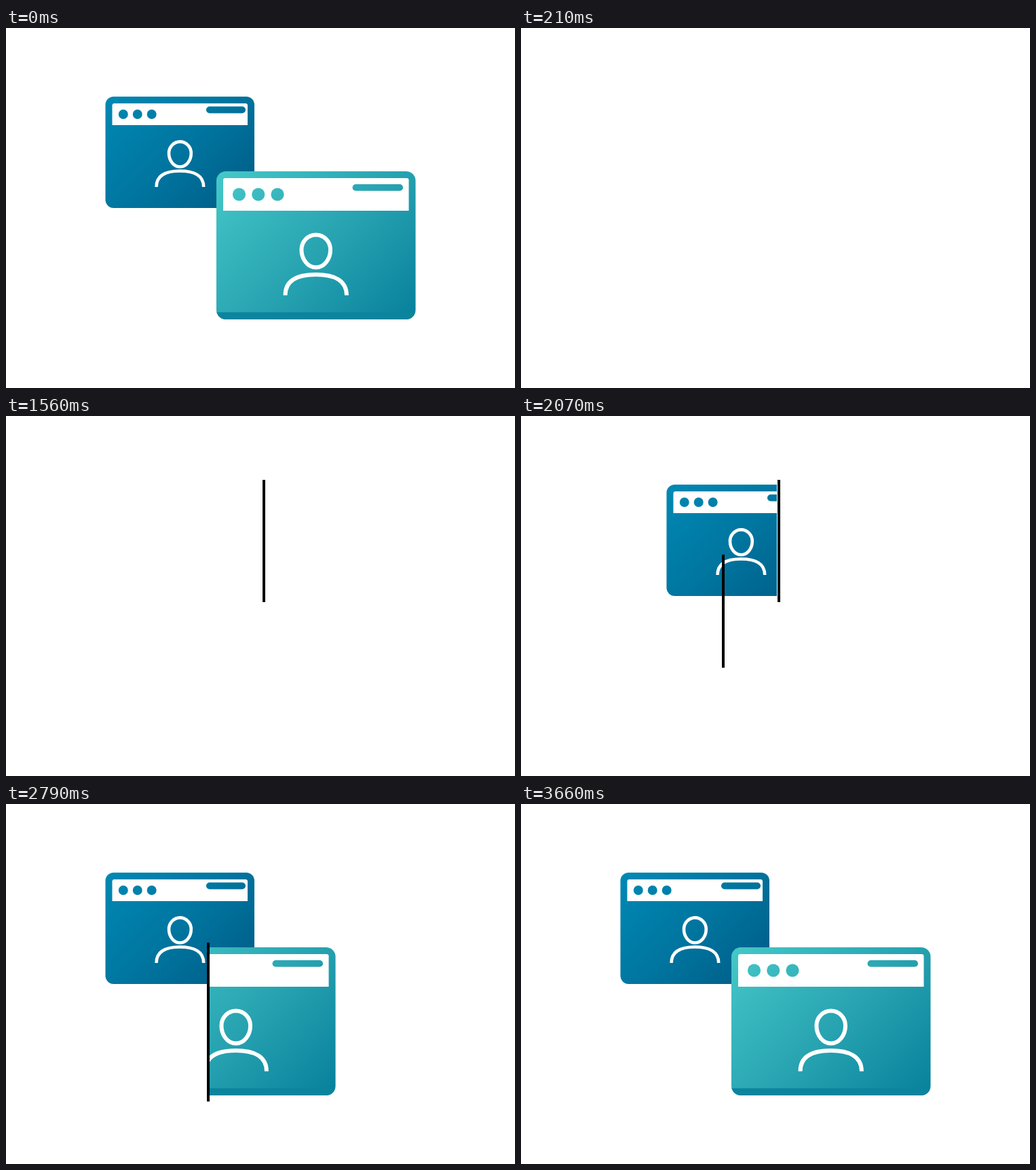
Animation of 750 by 530 pixels, one loop 3.9 s. Source, as an HTML page:

```html
<!DOCTYPE html>
<html lang="en">
<head>
<meta charset="utf-8">
<title>Two windows</title>
<style>
  html, body { margin: 0; height: 100%; overflow: hidden; background: #fff; }
  svg { display: block; }
</style>
</head>
<body>
<svg id="stage" width="750" height="530" viewBox="0 0 750 530"></svg>
<script>
const LOOP = 3900, TICK = 30;
const stage = document.getElementById('stage');

function windowMarkup(w) {
  const reach = (w.width + w.height) / 2;
  const fill = `url(#${w.id}-fill)`;
  const dots = [0, 1, 2].map(i =>
    `<circle cx="${w.dotX + i * w.dotGap}" cy="${w.dotY}" r="${w.dotR}" fill="${fill}"/>`).join('');
  const [barX, barY, barW, barH] = w.bar;
  const [clipX, clipW] = w.clip;
  return `
    <linearGradient id="${w.id}-fill" gradientUnits="userSpaceOnUse"
      x1="${w.x}" y1="${w.y}" x2="${w.x + reach}" y2="${w.y + reach}">
      <stop stop-color="${w.colors[0]}"/>
      <stop offset=".5" stop-color="${w.colors[1]}"/>
      <stop offset="1" stop-color="${w.colors[2]}"/>
    </linearGradient>
    <clipPath id="${w.id}-clip"><rect x="${clipX}" width="${clipW}" height="530"/></clipPath>
    <clipPath id="${w.id}-shape">
      <rect x="${w.x}" y="${w.y}" width="${w.width}" height="${w.height}" rx="${w.radius}"/>
    </clipPath>
    <g clip-path="url(#${w.id}-clip)"><g id="${w.id}">
      <rect x="${w.x}" y="${w.y}" width="${w.width}" height="${w.height}" rx="${w.radius}" fill="${fill}"/>
      ${w.base ? `<rect x="${w.x}" y="${w.y + w.height - 10.5}" width="${w.width}" height="10.5"
        fill="${w.base}" clip-path="url(#${w.id}-shape)"/>` : ''}
      <path d="M${w.x + 10} ${w.y + 10 + w.header}v${3 - w.header}q0-3 3-3h${w.width - 26}q3 0 3 3v${w.header - 3}z" fill="#fff"/>
      ${dots}
      <rect x="${barX}" y="${barY}" width="${barW}" height="${barH}" rx="${barH / 2}" fill="${fill}"/>
      <g transform="translate(${w.person}) scale(${w.personScale})" fill="none" stroke="#fff" stroke-width="6">
        <path d="M-21.3-2A21.3 22 0 0 1 21.3-2A21.3 26 0 0 1-21.3-2z"/>
        <path transform="translate(0 ${w.bodyShift})" d="M-45.2 65C-45.2 43-27 34.5 0 34.5S45.2 43 45.2 65"/>
      </g>
    </g></g>`;
}

stage.innerHTML = windowMarkup({
  id: 'back', x: 146.5, y: 101, width: 219.5, height: 164, radius: 12, header: 32,
  colors: ['#0089b4', '#00759f', '#005a85'],
  dotX: 172.8, dotY: 127, dotGap: 20.95, dotR: 7,
  bar: [295, 115.5, 58, 10], person: '256.4 185.8', personScale: .77, bodyShift: -2.4,
  clip: [0, 377]
}) + windowMarkup({
  id: 'front', x: 310, y: 211, width: 293.5, height: 218, radius: 14, header: 48,
  colors: ['#45c8c8', '#29a5b2', '#07809c'], base: '#0c849e',
  dotX: 343.5, dotY: 245, dotGap: 28.25, dotR: 9.6,
  bar: [510.5, 230, 74.5, 9.8], person: '456.7 328.5', personScale: 1, bodyShift: 0,
  clip: [300, 450]
}) + `
  <rect id="lineA" x="378" y="94" width="4"/>
  <rect id="lineB" x="296" y="204" width="4"/>`;

const [back, front, lineA, lineB] =
  ['back', 'front', 'lineA', 'lineB'].map(id => document.getElementById(id));

// cubic-bezier(1/3, 0, 0, 1)
function ease(p) {
  if (p <= 0) return 0;
  if (p >= 1) return 1;
  let low = 0, high = 1;
  for (let i = 0; i < 30; i++) {
    const s = (low + high) / 2;
    if (s ** 3 + s * (1 - s) ** 2 < p) low = s; else high = s;
  }
  return low * low * (3 - 2 * low);
}

const progress = (t, start, duration) => ease((t - start) / duration);

function place(el, t, start, distance) {
  const fading = t < 960;
  const offset = fading ? 0 : distance * (1 - progress(t, start, 600));
  el.setAttribute('transform', `translate(${offset} 0)`);
  el.setAttribute('opacity', fading ? Math.max(0, Math.min(1, (210 - t) / 150)) : 1);
}

function stretch(line, t, length, growAt, shrinkAt) {
  line.setAttribute('height', length * (progress(t, growAt, 600) - progress(t, shrinkAt, 300)));
}

function draw(now) {
  const t = Math.floor(now % LOOP / TICK) * TICK;
  place(back, t, 1860, 236);
  place(front, t, 2610, -314);
  stretch(lineA, t, 180, 960, 2460);
  stretch(lineB, t, 234, 1860, 3360);
}

const begin = performance.now();
(function loop() {
  draw(performance.now() - begin);
  requestAnimationFrame(loop);
})();
</script>
</body>
</html>
```
